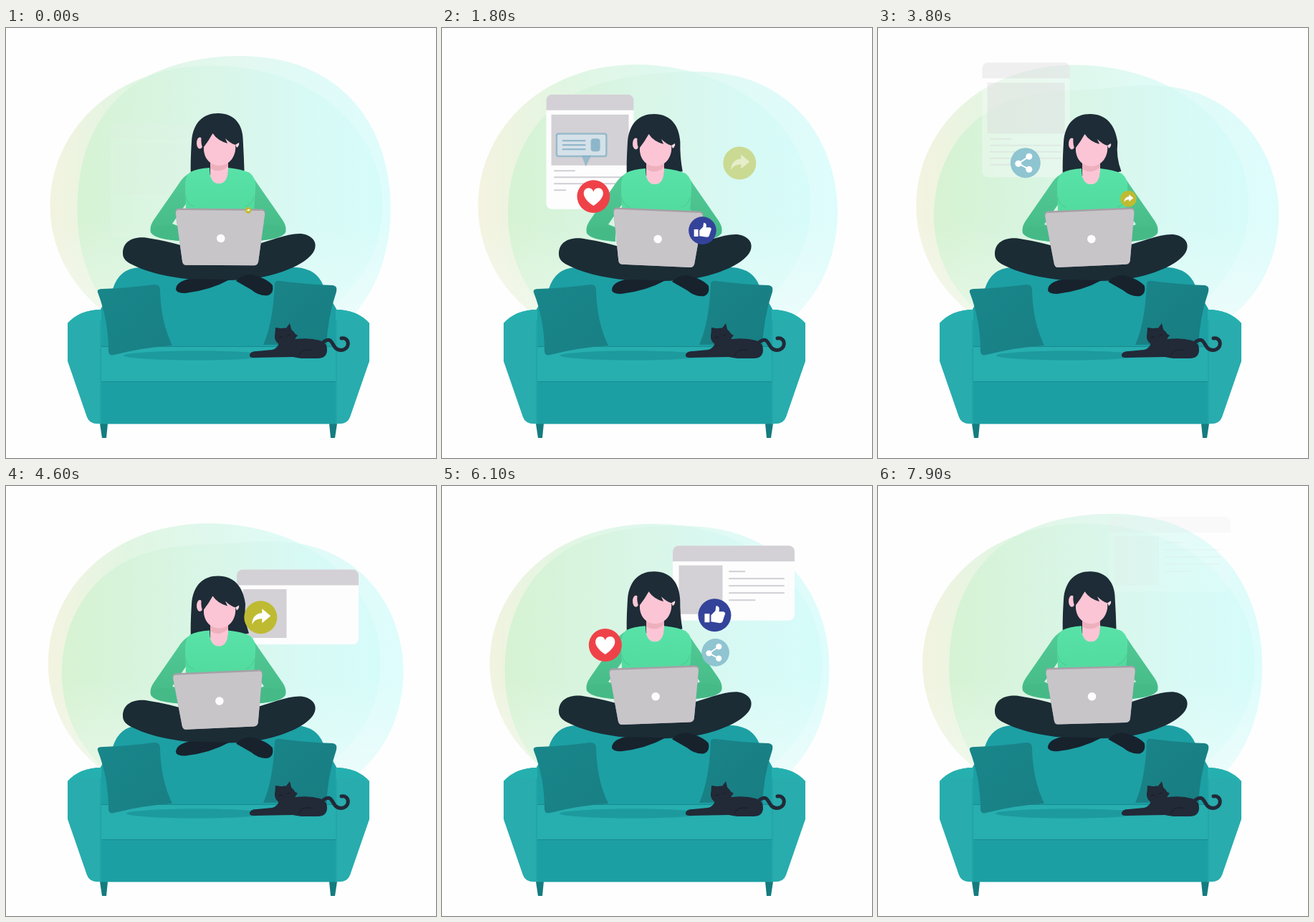
Write an HTML page with a canvas that moves like this. It is 600x600 px and loops after 8000 ms.

```html
<!DOCTYPE html>
<html lang="en">
<head>
<meta charset="utf-8">
<title>Social sofa</title>
<style>
html, body { margin: 0; width: 100%; height: 100%; overflow: hidden; background: #fefefe; }
canvas { display: block; width: 100vw; height: 100vh; }
</style>
</head>
<body>
<canvas id="stage" width="600" height="600"></canvas>
<script>
const ctx = document.getElementById('stage').getContext('2d');
const LOOP = 8000, STEP = 100, TAU = Math.PI * 2;
const { sin, cos } = Math;

const clamp = v => Math.max(0, Math.min(1, v));
const wave = (t, period, peak = 0) => cos(TAU * (t - peak) / period);

function shape(d, color) {
  ctx.fillStyle = color;
  ctx.fill(new Path2D(d));
}
function line(d, color, width) {
  ctx.strokeStyle = color;
  ctx.lineWidth = width;
  ctx.lineCap = 'round';
  ctx.stroke(new Path2D(d));
}
function disc(x, y, rx, ry, color) {
  ctx.fillStyle = color;
  ctx.beginPath();
  ctx.ellipse(x, y, rx, ry, 0, 0, TAU);
  ctx.fill();
}
function box(x, y, w, h, r, color) {
  ctx.fillStyle = color;
  ctx.beginPath();
  ctx.roundRect(x, y, w, h, r);
  ctx.fill();
}
function fade(x0, y0, x1, y1, ...stops) {
  const g = ctx.createLinearGradient(x0, y0, x1, y1);
  stops.forEach((c, i) => g.addColorStop(i / (stops.length - 1), c));
  return g;
}
function group(draw) {
  ctx.save();
  draw();
  ctx.restore();
}
function mirrored(axis, draw) {
  draw();
  group(() => {
    ctx.translate(axis * 2, 0);
    ctx.scale(-1, 1);
    draw();
  });
}

// Polar outline; the angle a runs from the left over the top.
function blob(radius, color) {
  ctx.beginPath();
  for (let a = 0; a < TAU; a += TAU / 120) {
    const r = radius(a);
    ctx.lineTo(305 - r * cos(a), 250 - r * sin(a));
  }
  ctx.fillStyle = color;
  ctx.fill();
}

function backdrop(t) {
  ctx.fillStyle = '#fefefe';
  ctx.fillRect(0, 0, 600, 600);

  const pull = 9 * wave(t, LOOP, 2500);
  blob(a => 213 + (15 + pull) * cos(a) + 19 * cos(2 * a) + 3 * sin(a),
    fade(50, 0, 530, 0, '#f4f3e0', '#e1f6e2', '#dff8ee', '#e0fcf8', '#e2fdfb'));

  const stretch = wave(t, LOOP, -250) + 0.1;
  const sway = 4 * wave(t, LOOP, 2000);
  ctx.globalAlpha = 0.7;
  blob(a => 216 - (13 + sway) * cos(a) + 18.5 * cos(2 * a) - 8 * sin(a) - 4 * cos(4 * a)
      + stretch * (3 - 14 * cos(2 * a) + 6 * sin(a)),
    fade(80, 0, 550, 0, '#ccf2cc', '#d4f3dc', '#d7f5e8', '#d3f9f5', '#d0fcfb'));
  ctx.globalAlpha = 1;

  ctx.fillStyle = fade(0, 270, 0, 410, 'rgba(254,254,254,0)', 'rgba(254,254,254,.4)');
  ctx.fillRect(0, 270, 600, 140);
}

const cards = [
  { start: 0, x: 145.5, y: 133, w: 122, h: 160, pic: [7, 28, 108, 71], text: { x: 10.5, y: 106.5, w: 100, gap: 9 } },
  { start: 4000, x: 322, y: 130, w: 170, h: 104.5, pic: [8.5, 27.5, 61, 68], text: { x: 78, y: 36, w: 78, gap: 10 } }
];

// A short heading, three full lines and half a line, typed in turn.
function typeText({ x, y, w, gap }, typed) {
  [0.3, 1, 1, 1, 0.48].forEach((part, i) => {
    const shown = Math.min(w * part, typed);
    if (shown > 0) box(x, y + i * gap - 1, shown, 2, 1, '#d0ced3');
    typed -= shown;
  });
}

function card(c, t) {
  const u = t - c.start;
  if (u < 0 || u >= LOOP / 2) return;
  group(() => {
    ctx.globalAlpha = Math.min(clamp(0.08 + u / 400), clamp((3950 - u) / 430));
    ctx.translate(c.x, c.y - u * 0.0223);
    box(0, 0, c.w, c.h, 8, '#fdfdfe');
    box(0, 0, c.w, 22, [8, 8, 0, 0], '#d3d1d5');
    box(...c.pic, 0, '#d3d1d5');
    typeText(c.text, (u - 700) * 0.225);
  });
}

function pillows() {
  shape('M128 369Q126 364 135 364Q170 363 206 358Q215 357 215 366Q216 410 232 443Q190 446 151 456Q143 458 143 451Q143 408 128 369Z',
    fade(130, 360, 220, 455, '#18868a', '#198085'));
  shape('M375 356Q376 352 383 353Q420 358 456 359Q463 360 461 368Q448 405 447 449Q400 440 359 442Q373 410 375 356Z',
    fade(370, 355, 450, 450, '#198488', '#187d82'));
}

function sofa(lift) {
  mirrored(296.5, () => shape('M131 552H142L140 572H134Z', '#147c7f'));
  shape('M149 364Q158 335 187 334H405Q434 336 443 360L462 394V446H131V394Z', '#1ca0a4');
  ctx.fillStyle = '#27aeaf';
  ctx.fillRect(131, 444, 331, 49);
  ctx.fillStyle = '#1c9fa3';
  ctx.fillRect(131, 493, 331, 59.5);
  line('M133 444.5H460M133 493.5H460', '#178b90', 1.2);
  mirrored(296.5, () => {
    shape('M86 412Q103 393 133 393V552Q117 554 113 543L86 465Z', '#28acae');
    shape('M86 412Q103 393 133 393V411Q128 407 112 407Q94 407 86 414Z', '#25b0af');
    line('M132 408V550', '#1f9da0', 1);
  });
  disc(266, 457, 102 - lift * 0.6, 6.5, '#1c9a9d');
  pillows();
}

function cat() {
  const fur = '#222937';
  line('M443 438C458 428 453 449 467 449.500C481 449 480 431 468 433', fur, 5);
  shape('M340 456Q341 451 350 451L371 449Q380 447 381 438L398 435Q420 431 438 436Q449 440 448 450Q447 461 435 461H412Q405 460 400 459L346 460Q339 460 340 456Z', fur);
  disc(389.5, 431, 14.5, 12.5, fur);
  shape('M375 432L376 418L390 420L396 412L399 424L407 429L400 437Z', fur);
  line('M408 457Q412 447 426 449M381 432L386 431M392 430L396 428', '#171e29', 1);
}

function head(t) {
  const tip = 335 + 3.5 * wave(t, LOOP, 3900);
  const hair = '#1d2c36', skin = '#fcc5d5';
  shape(`M258 207Q257 190 259 158C261 132 275 119 296 119C318 119 331 134 ${(tip + 330) / 2} 158Q332 180 ${tip + 1} 199Q322 204 300 204Z`, hair);
  shape('M285 183H310V200Q310 217 297 217Q285 217 285 200Z', skin);
  shape('M285 187Q297 194 310 187V193Q298 204 285 196Z', '#eeb0bd');
  disc(270.5, 160.5, 4.5, 8, skin);
  line('M274 153Q273 162 277 170', hair, 3);
  shape('M276 166Q283 157 288.500 147Q295 157 309 161L306 154Q313 161 320 163C322 178 312 192 298 192C284 192 275 180 276 166Z', skin);
  shape('M320 163L325 160Q326 164 322 167Z', '#f5d9e4');
}

function laptop(t) {
  ctx.translate(299, 331);
  ctx.rotate(0.045 * wave(t, 800, 180));
  ctx.translate(-299, -331);
  shape('M241 252H355Q362 252 361 259L352 326Q351 331 346 331H251Q247 331 246 326L236 259Q235 252 241 252Z', '#a5a1a6');
  shape('M241 254.5H355Q361 254 360.5 260L352 326Q351 331 346 331H251Q247 331 246 326L236.5 260Q236 254 241 254.5Z', '#c8c5c9');
  disc(299.5, 293.5, 5.8, 5.8, '#fdfdfd');
}

function woman(t, lift) {
  group(() => {
    ctx.translate(0, lift);
    shape('M163 314.500C163 297 178 291 195 292.500C222 297 240 301 254 307L342 304C370 297 392 286 412 287C427 289 434 298 431 308C426 324 398 338 365 346C340 352 315 352 290 352C240 352 200 342 180 332C168 327 163 322 163 314.500Z', '#1b2c35');
    shape('M237 365Q237 354 256 350L312 351Q285 366 250 370Q238 370 237 365Z', '#17222d');
    shape('M321 353Q328 344 342 344Q364 349 372 359Q374 370 366 373Q354 375 342 365Z', '#17222d');
    head(t);
    mirrored(296, () => {
      shape('M257 202Q247 207 240 219L206 268Q197 282 206 289Q216 294 242 297V277L232 273L252 244Z',
        fade(0, 205, 0, 295, '#52cb96', '#45b987'));
      shape('M203 279Q220 273 242 278V297Q214 295 206 289Q199 285 203 279Z', '#45ba87');
    });
    shape('M284 195Q284 217 297 217Q310 217 310 195Q329 197 340 202Q350 210 348 224L346 256H251L250 224Q249 207 257 201Q267 196 284 195Z',
      fade(0, 196, 0, 256, '#59e2a8', '#52db9e'));
    line('M251 236Q253 247 262 249M346 236Q343 247 334 249', '#49c890', 1);
    group(() => laptop(t));
  });
}

const icons = {
  heart() {
    disc(0, 0, 23, 23, '#ef4248');
    shape('M0 13C-20 0 -14 -12 -7 -12C-2 -12 0 -8 0 -6C0 -8 2 -12 7 -12C14 -12 20 0 0 13Z', '#fff');
  },
  thumb() {
    disc(0, 0, 23, 23, '#34439a');
    shape('M-14 -2H-7V10H-14Z', '#fff');
    shape('M-5 0L1 -6L2 -13Q8 -13 6 -5H12Q16 -4 14 0L11 9Q10 11 7 11L-5 9Z', '#fff');
  },
  arrow() {
    disc(0, 0, 23, 23, '#bebb32');
    shape('M-12 10C-12 -1 -5 -6 2 -6V-12L14 -2L2 8V2C-5 2 -9 4 -12 10Z', '#fff');
  },
  nodes() {
    disc(0, 0, 21, 21, '#8fc4d1');
    line('M5 -9L-10 1L5 9', '#fff', 2);
    for (const [x, y] of [[5, -9], [-10, 1], [5, 9]]) disc(x, y, 4.5, 4.5, '#fff');
  },
  bubble() {
    shape('M0 14L6 30L14 14Z', '#7fb0c6');
    box(-36, -17, 72, 34, 4, '#7fb0c6');
    box(-33.5, -14.5, 67, 29, 2, '#f1f3f5');
    for (const y of [-6, 0, 6]) box(-27, y - 1, 33, 2, 1, '#6a9fba');
    box(13, -9, 13, 18, 4, '#6fa3bd');
  }
};

// Each icon leaves the laptop at (x, y) and drifts by (dx, dy) over its life.
const flight = (kind, start, x, y, dx, dy, life = 2050) => ({ kind, start, x, y, dx, dy, life });
const flights = [
  flight('arrow', -70, 335, 257, 88, -75),
  flight('bubble', 0, 235, 245, -46, -93),
  flight('heart', 1150, 212, 250, -2, -47),
  flight('thumb', 1380, 354, 309, 46, -129),
  flight('nodes', 3110, 215, 225, -18, -72, 1350),
  flight('arrow', 3600, 348, 252, 15, -141),
  flight('heart', 4950, 239, 273, -20, -91),
  flight('thumb', 4930, 377, 235, 6, -96),
  flight('nodes', 5600, 372, 255, 26, -61, 1350)
];

function fly(f, t) {
  const u = (t - f.start + LOOP) % LOOP;
  if (u >= f.life) return;
  const p = u / f.life;
  const size = 1 - (1 - clamp(u / 700)) ** 2;
  group(() => {
    ctx.globalAlpha = clamp((f.life - u) / 360);
    ctx.translate(f.x + f.dx * p, f.y + f.dy * p);
    ctx.scale(size, size);
    icons[f.kind]();
  });
}

function draw(t) {
  const lift = 5 - 5 * wave(t, 2000);
  backdrop(t);
  cards.forEach(c => card(c, t));
  sofa(lift);
  woman(t, lift);
  cat();
  flights.forEach(f => fly(f, t));
}

const begin = performance.now();
function tick() {
  const t = (performance.now() - begin) % LOOP;
  draw(Math.floor(t / STEP) * STEP);
  requestAnimationFrame(tick);
}
tick();
</script>
</body>
</html>
```
